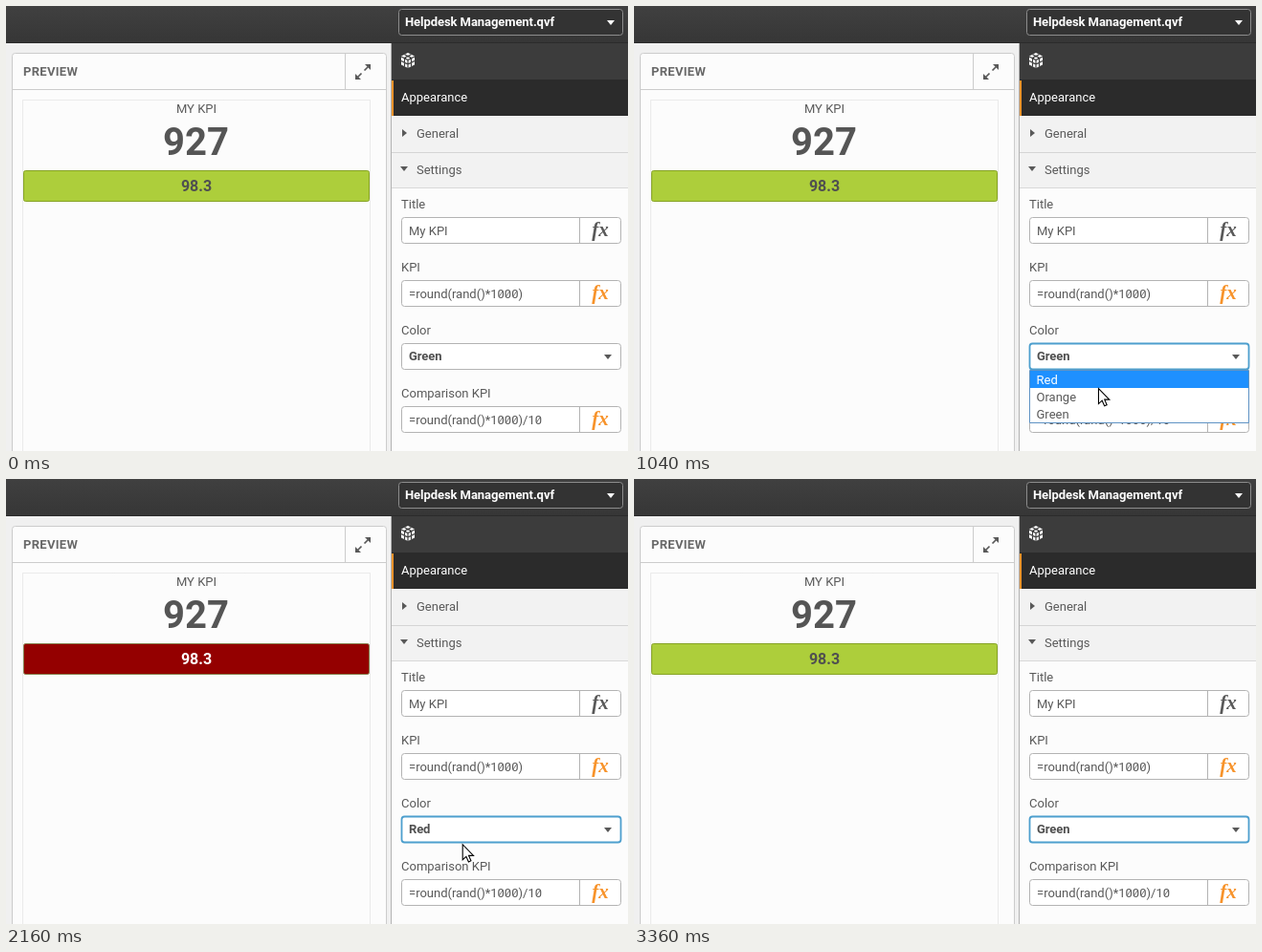
Recreate the animation shown at these times as an HTML page with a canvas. Size 650x466 px, loop 3.4 s.

```html
<!DOCTYPE html>
<html lang="en">
<head>
<meta charset="utf-8">
<title>KPI colour settings</title>
<style>
html, body { margin: 0; width: 650px; height: 466px; overflow: hidden; }
canvas { display: block; }
</style>
</head>
<body>
<canvas id="stage" width="650" height="466"></canvas>
<script>
const ctx = document.getElementById('stage').getContext('2d');
const LOOP = 3400;
const OPTIONS = ['Red', 'Orange', 'Green'];
const BARS = {
  Green: { fill: '#adce3b', edge: '#86a324', text: '#505050' },
  Orange: { fill: '#ff993e', edge: '#dd7a2a', text: '#505050' },
  Red: { fill: '#940000', edge: '#86804e', text: '#ffffff' }
};

// Timelines: [start, value]
const CHOICE = [[0, 'Green'], [1160, 'Orange'], [2040, 'Red'], [2720, 'Green']];
const BAR = [[0, 'Green'], [1240, 'Orange'], [2120, 'Red'], [2960, 'Green']];
const OPEN = [[0, false], [540, true], [1160, false], [1720, true], [2040, false], [2400, true], [2720, false]];
const FOCUS = [[0, false], [500, true]];

// Pointer stops: [time, x, y]
const PATH = [
  [40, 652, 402], [440, 525, 364], [760, 525, 364], [1060, 485, 401], [1440, 485, 401],
  [1620, 484, 367], [1760, 484, 367], [1880, 482, 382], [1980, 479, 391], [2080, 479, 391],
  [2280, 474, 368], [2420, 474, 368], [2560, 472, 397], [2700, 469, 426], [2880, 469, 426], [3240, 655, 432]
];

const at = (timeline, t) => timeline.filter(([start]) => start <= t).pop()[1];

function pointerAt(t) {
  const i = PATH.findIndex(([time]) => time > t);
  if (i < 1) return null;
  const [t0, x0, y0] = PATH[i - 1], [t1, x1, y1] = PATH[i];
  const u = (t - t0) / (t1 - t0), e = u * u * (3 - 2 * u);
  return { x: x0 + (x1 - x0) * e, y: y0 + (y1 - y0) * e };
}

function rect(x, y, w, h, fill) {
  ctx.fillStyle = fill;
  ctx.fillRect(x, y, w, h);
}

function box(x, y, w, h, fill, edge, radius = 3, line = 1) {
  ctx.beginPath();
  ctx.roundRect(x + .5, y + .5, w - 1, h - 1, radius);
  ctx.fillStyle = fill;
  ctx.fill();
  ctx.strokeStyle = edge;
  ctx.lineWidth = line;
  ctx.stroke();
}

function poly(points, fill, edge) {
  ctx.beginPath();
  for (let i = 0; i < points.length; i += 2) ctx.lineTo(points[i], points[i + 1]);
  ctx.closePath();
  ctx.fillStyle = fill;
  ctx.fill();
  if (edge) {
    ctx.strokeStyle = edge;
    ctx.lineWidth = 1;
    ctx.stroke();
  }
}

function text(str, x, y, { color = '#595959', font = '13px', align = 'left', spacing = 0, family = 'Roboto, sans-serif' } = {}) {
  ctx.font = `${font} ${family}`;
  ctx.letterSpacing = spacing + 'px';
  ctx.textAlign = align;
  ctx.fillStyle = color;
  ctx.fillText(str, x, y);
}

function slashZeros(str, x, y) {
  ctx.strokeStyle = '#686868';
  ctx.lineWidth = .9;
  ctx.beginPath();
  [...str].forEach((c, i) => {
    if (c !== '0') return;
    const left = x + ctx.measureText(str.slice(0, i)).width;
    ctx.moveTo(left + 1.8, y - 2);
    ctx.lineTo(left + 5.6, y - 7.4);
  });
  ctx.stroke();
}

const downArrow = (x, y, color) => poly([x - 4, y - 2, x + 4, y - 2, x, y + 3], color);

function field(label, value, y, fxColor) {
  text(label, 413, y - 9);
  box(413, y, 230, 28, '#ffffff', '#b3b3b3');
  rect(599, y, 1, 28, '#b3b3b3');
  text(value, 421, y + 19);
  slashZeros(value, 421, y + 19);
  text('fx', 621, y + 20, { color: fxColor, font: 'italic bold 21px', align: 'center', family: '"Liberation Serif", serif' });
}

function drawCube(x, y) {
  poly([x, y - 8, x + 7, y - 4.5, x + 7, y + 4.5, x, y + 8, x - 7, y + 4.5, x - 7, y - 4.5], '#ffffff');
  ctx.strokeStyle = '#3c3c3c';
  ctx.lineWidth = 1.2;
  ctx.stroke(new Path2D(`M${x - 7} ${y - 4}l7 3.5l7 -3.5M${x} ${y - .5}v9
    M${x - 3.5} ${y - 6.2}l7 3.6M${x + 3.5} ${y - 6.2}l-7 3.6
    M${x - 3.5} ${y - 2}v8.5M${x + 3.5} ${y - 2}v8.5M${x - 7} ${y + .5}l7 3.5l7 -3.5`));
}

function drawExpand() {
  poly([381, 61, 381, 67, 375, 61], '#595959');
  poly([365, 77, 365, 71, 371, 77], '#595959');
  ctx.strokeStyle = '#595959';
  ctx.lineWidth = 1.7;
  ctx.stroke(new Path2D('M379 63l-4.5 4.5M367 75l4.5 -4.5'));
}

function drawPreview(bar, strip) {
  rect(0, 39, 402, 427, '#f0f0f0');
  box(6, 49, 392, 430, '#fcfcfc', '#cccccc');
  rect(7, 87, 390, 1, '#cccccc');
  rect(354, 50, 1, 37, '#cccccc');
  text('PREVIEW', 18, 73, { font: 'bold 13px', color: '#686868', spacing: .3 });
  drawExpand();
  ctx.strokeStyle = '#d8d8d8';
  ctx.lineWidth = 1;
  ctx.setLineDash([1, 1]);
  ctx.strokeRect(17.5, 98.5, 363, 380);
  ctx.setLineDash([]);
  text('MY KPI', 199, 112, { align: 'center' });
  text('927', 198.5, 156, { font: 'bold 40px', align: 'center', color: '#555555' });
  const { fill, edge, text: color } = BARS[bar];
  box(18, 172, 362, 33, fill, edge, 2);
  if (strip) rect(32, 173, 336, 3, BARS.Green.fill);
  text('98.3', 199, 194, { font: 'bold 16px', align: 'center', color });
}

function drawChrome() {
  const shade = ctx.createLinearGradient(0, 0, 0, 39);
  shade.addColorStop(0, '#404040');
  shade.addColorStop(1, '#363636');
  rect(0, 0, 650, 39, shade);
  rect(0, 38, 650, 1, '#2b2b2b');
  box(410, 3, 235, 28, '#333333', '#8c8c8c');
  text('Helpdesk Management.qvf', 417, 21, { font: 'bold 13px', color: '#ffffff', spacing: -.07 });
  downArrow(632, 17, '#ffffff');
}

function drawSettings(choice, focused) {
  rect(402, 39, 1, 427, '#b3b3b3');
  rect(403, 39, 247, 39, '#3c3c3c');
  drawCube(420, 57);
  rect(403, 77, 247, 38, '#2b2b2b');
  rect(403, 78, 2, 37, '#f7932b');
  text('Appearance', 413, 100, { color: '#ffffff' });
  rect(403, 115, 247, 76, '#f2f2f2');
  rect(403, 153, 247, 1, '#d4d4d4');
  rect(403, 190, 247, 1, '#d9d9d9');
  poly([414, 129, 419, 133, 414, 137], '#595959');
  downArrow(416, 170, '#595959');
  text('General', 429, 138);
  text('Settings', 429, 176);
  rect(403, 191, 247, 275, '#fcfcfc');
  field('Title', 'My KPI', 221, '#595959');
  field('KPI', '=round(rand()*1000)', 287, '#f7932b');
  field('Comparison KPI', '=round(rand()*1000)/10', 419, '#f7932b');
  text('Color', 413, 344);
  box(413, 353, 230, 28, '#ffffff', focused ? '#4d9fce' : '#b3b3b3', 3, focused ? 1.8 : 1);
  text(choice, 421, 371, { font: 'bold 13px', color: '#505050', spacing: -.1 });
  downArrow(629, 367, '#595959');
}

function drawList(choice, pointer) {
  const hovered = pointer && OPTIONS[Math.floor((pointer.y - 383) / 18)];
  box(413, 381, 230, 56, '#ffffff', '#5f93c4', 0);
  OPTIONS.forEach((name, i) => {
    const y = 382 + 18 * i, active = name === (hovered || choice);
    if (active) rect(414, y, 228, 18, '#1e90ff');
    text(name, 420.5, y + 13.5, { color: active ? '#ffffff' : '#595959' });
  });
}

const ARROW = new Path2D('M0 0V16L3.7 12.6L6.2 18.2L8.7 17.1L6.3 11.6H11.3Z');
const HAND = new Path2D('M-1.6 1Q0 -1.6 1.6 1V8Q3 6.6 4.4 8.6Q6 7.4 7.2 9.4Q9.2 8.4 10 11V15Q10 18 8 20V22H-1V20L-5.6 13.5Q-6 10.6 -3.6 11.4L-1.6 13.4Z');
const BEAM = new Path2D('M-3 -7.5H-1L0 -6.5L1 -7.5H3M0 -6.5V6.5M-3 7.5H-1L0 6.5L1 7.5H3');

function drawPointer({ x, y }, open) {
  const onSelect = y > 353 && y < 381 && x > 413 && x < 643;
  const onField = !open && y > 419 && y < 447 && x > 413 && x < 643;
  ctx.save();
  ctx.translate(x, y);
  ctx.lineWidth = 1.1;
  ctx.strokeStyle = '#000000';
  ctx.fillStyle = '#ffffff';
  if (onField && x < 599) {
    ctx.stroke(BEAM);
  } else {
    const shape = onSelect || onField ? HAND : ARROW;
    ctx.fill(shape);
    ctx.stroke(shape);
    if (shape === HAND) ctx.stroke(new Path2D('M1.6 8V12M4.4 9V12M7.2 10V12.5'));
  }
  ctx.restore();
}

function draw() {
  const t = performance.now() % LOOP;
  const choice = at(CHOICE, t), open = at(OPEN, t), pointer = pointerAt(t);
  drawChrome();
  drawPreview(at(BAR, t), t >= 1240 && t < 1480);
  drawSettings(choice, at(FOCUS, t));
  if (open) drawList(choice, pointer);
  if (pointer) drawPointer(pointer, open);
  requestAnimationFrame(draw);
}
draw();
</script>
</body>
</html>
```
